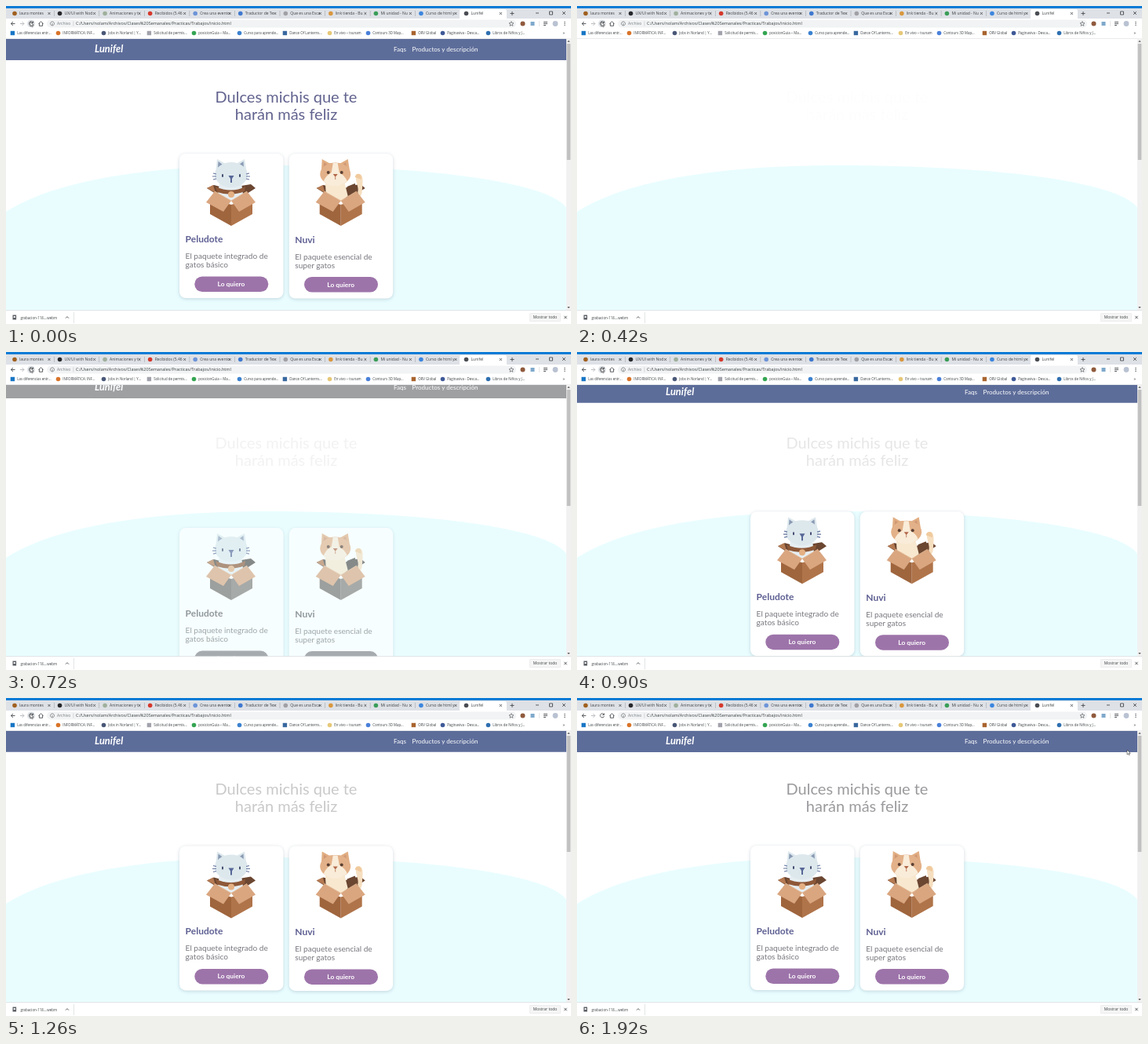
Write an HTML page that moves like this. It is 720 px wide and 405 px high and loops after 1.95 s.

```html
<!DOCTYPE html>
<html lang="es">
<head>
<meta charset="utf-8">
<style>
html, body { margin: 0; width: 100%; height: 100%; overflow: hidden; background: #fff; }
svg { display: block; width: 720px; height: 405px; }
text { font-family: Lato, sans-serif; }
.ui text { font: 5px "Open Sans", sans-serif; fill: #3c4043; }
.ui .mark { font-size: 4.4px; }
.ui .url { font-size: 5.5px; }
.line { fill: none; stroke: #4a4d51; stroke-width: .9; }
.card { filter: drop-shadow(0 1.5px 2px #2a456038); }
.dim .tint { filter: saturate(.1); }
</style>
</head>
<body>
<svg id="stage" viewBox="0 0 720 405">
  <defs>
    <g id="boxBack">
      <path d="M-31 232L-22 228L0 234L13 229L25 227L31 232L20 239L0 248L-20 239Z" fill="#6b4631" class="tint"/>
      <path d="M-31 232L-23 228L-20 238Z" fill="#b57a52"/>
    </g>
    <g id="boxFront">
      <g class="tint">
        <path d="M-27 245L0 253V280L-27 265Z" fill="#9f653d"/>
        <path d="M27 245L0 253V280L27 265Z" fill="#b0744a"/>
      </g>
      <path d="M-21 236L0 248L-10 262L-32 250Z" fill="#d9a680"/>
      <path d="M20 236L31 250L10 262L0 248Z" fill="#d9a680"/>
      <path d="M-21 236L0 248L20 236" fill="none" stroke="#e6bd99" stroke-width=".8"/>
    </g>
    <g id="cat0">
      <path d="M-15 225H13L15 240L0 249L-17 239Z" fill="#e6eef2"/>
      <path d="M-20 214L-18 195L-7 201H6L17 195L20 214Z" fill="#dde8ed"/>
      <path d="M-17 206L-16.5 198L-11 202ZM16 206L15.5 198L10 202Z" fill="#8a9ab4"/>
      <ellipse cy="215" rx="21" ry="16" fill="#dde8ed"/>
      <path d="M-20 230Q0 239 18 230L17 236Q0 243-18 237Z" fill="#8d5838"/>
      <circle cy="240" r="4" fill="#e4b083"/>
      <path d="M-23 213L-19 214M-24 217H-19M-23 221L-19 220M23 213L19 214M24 217H19M23 221L19 220" stroke="#6676a0" stroke-width="1.1"/>
      <path d="M-3.5 216H3.5L1 220V225H-1V220Z" fill="#576797"/>
      <path d="M-11 215V217M11 215V217" stroke="#454f70" stroke-width="2" stroke-linecap="round"/>
    </g>
    <g id="cat1">
      <path d="M18 240C29 236 13 218 22 214C31 213 27 229 27 238Q25 245 18 245Z" fill="#f6dfc0"/>
      <path d="M18 218Q19 213 24 214Q27 216 26 221Z" fill="#f0ca9d"/>
      <path d="M8 230L18 226L22 239L10 244Z" fill="#6b4631" class="tint"/>
      <path d="M-20 222H4L9 242L0 249L-19 239Z" fill="#f8e8cf"/>
      <path d="M-25 214L-24 195L-15 200H0L9 195L12 214Z" fill="#e1ad82"/>
      <path d="M-22 206L-21.5 199L-17 202ZM7 206L6.5 199L2 202Z" fill="#cf9774"/>
      <ellipse cx="-7" cy="214" rx="19.5" ry="14.5" fill="#e3b189"/>
      <path d="M-10 200H-4L-2 212Q6 217 8 223Q0 230-7 229Q-16 230-22 223Q-19 216-12 212Z" fill="#f9ecd9"/>
      <circle cx="-16" cy="212" r="2" fill="#5b4033"/>
      <circle cx="1" cy="212" r="2" fill="#5b4033"/>
      <path d="M-10 214H-4L-7 218Z" fill="#b3694a"/>
      <path d="M-7 218V221" stroke="#b3694a" stroke-width=".8"/>
    </g>
  </defs>

  <path d="M0 262C65 221 185 203 335 203C520 203 690 222 714 257V388H0Z" fill="#e9fdff"/>
  <g id="cards"></g>
  <g id="title" font-size="20" text-anchor="middle">
    <text x="357" y="122.5">Dulces michis que te</text>
    <text x="357" y="144.5">harán más feliz</text>
  </g>
  <g id="header" class="tint" fill="#fff">
    <path d="M0 41H714V69H0Z" fill="#5d6d9a"/>
    <text x="113" y="59" font-size="12.8" font-weight="700" font-style="italic">Lunifel</text>
    <g font-size="8.05">
      <text x="494" y="58">Faqs</text>
      <text x="517.5" y="58">Productos y descripción</text>
    </g>
  </g>
  <g id="ui" class="ui"></g>
  <path id="cursor" d="M0 0V8L1.9 6.4L3.2 9L4.4 8.4L3.2 5.9H5.6Z" fill="#fff" stroke="#222" stroke-width=".7"/>
</svg>
<script>
const $ = id => document.getElementById(id);
const rect = (x, y, w, h, fill, r = 0) =>
  `<rect x="${x}" y="${y}" width="${w}" height="${h}" rx="${r}" fill="${fill}"/>`;
const dot = (x, y, r, fill) => `<circle cx="${x}" cy="${y}" r="${r}" fill="${fill}"/>`;
const label = (x, y, s, extra = '') => `<text x="${x}" y="${y}" ${extra}>${s}</text>`;
const line = (d, extra = '') => `<path class="line" d="${d}" ${extra}/>`;
const cross = (x, y, r) => line(`M${x - r} ${y - r}l${2 * r} ${2 * r}m0 ${-2 * r}l${-2 * r} ${2 * r}`);

function card(i, name, line1, line2) {
  const x = 221 + i * 139.7, y = i * .5;
  return `<g class="card">${rect(x, 188, 132.5, 184 + y, '#fff', 8)}</g>
    <g transform="translate(${x + 66} 0)">
      <use href="#boxBack"/><use href="#cat${i}"/><use href="#boxFront"/>
    </g>
    <g class="tint" transform="translate(${x} ${y})">
      ${label(7.6, 301, name, 'font-size="12" font-weight="700" fill="#5d5f92"')}
      <g font-size="10.1" fill="#77777f">${label(7.6, 322, line1)}${label(7.6, 333, line2)}</g>
      ${rect(19.3, 344.5, 94, 19.5, '#9d74aa', 9.75)}
      ${label(66, 357, 'Lo quiero', 'font-size="8.4" font-weight="700" fill="#fff" text-anchor="middle"')}
    </g>`;
}
$('cards').innerHTML =
  card(0, 'Peludote', 'El paquete integrado de', 'gatos básico') +
  card(1, 'Nuvi', 'El paquete esencial de', 'super gatos');

const tabs = [
  ['laura montes', '#a0601f'], ['UX/UI with Nod', '#26282b'], ['Animaciones y t', '#9fb09c'],
  ['Recibidos (5.46', '#d5392c'], ['Crea una evento', '#6d94d8'], ['Traductor de Te', '#3f78d0'],
  ['Que es una Esca', '#a0a0a5'], ['link tienda - Bu', '#d9973e'], ['Mi unidad - Nu', '#3a9d58'],
  ['Curso de html y', '#3c86df'], ['Lunifel', '#4a4d52']
];
const marks = [
  [8, '#1976c5', 'Las diferencias entr...'], [66, '#d9742a', 'INFORMÁTICA: INF...'],
  [124, '#4a5878', 'Jobs in Norland | Y...'], [182, '#a2a2ac', 'Solicitud de permis...'],
  [239, '#35a553', 'posicionGuia – Ma...'], [297, '#3c82cf', 'Curso para aprende...'],
  [355, '#39689f', 'Dance Of Lanterns...'], [412, '#e6c878', 'En vivo – tsunam'],
  [461, '#4a80d9', 'Contours 3D Map...'], [519, '#a8642f', 'ORV Global'],
  [556, '#3f5a98', 'Paginaviva - Desca...'], [614, '#2f6fb0', 'Libros de Niños y J...']
];

function browser() {
  let s = rect(0, 0, 720, 42, '#fff') + rect(0, 0, 720, 16, '#dee1e6') + rect(0, 0, 720, 3, '#0b7cd6') +
    rect(578, 4, 60, 14, '#fff', 2.5);
  tabs.forEach(([name, color], i) => {
    const x = 11 + i * 57.55;
    s += dot(x, 9.5, 2.8, color) + label(x + 6, 11.2, name) + cross(x + 44, 9.5, 1.4);
    if (i < 9) s += rect(x + 50, 6, .5, 7, '#9a9da2');
  });
  s += line('M642.5 9.5H647.5M645 7V12M675 9H679M692.5 7H696.5V11H692.5Z') + cross(711, 9, 1.9);

  // toolbar
  s += rect(52, 17.5, 598, 10, '#f1f3f4', 5) +
    `<g id="hover">${dot(32, 22.5, 5, '#dfe2e6')}</g>` +
    line('M11.5 22.5H6.5M9 20L6.5 22.5L9 25') +
    line('M18 22.5H23M20.5 20L23 22.5L20.5 25', 'style="stroke:#b5b8bc"') +
    line('M34.4 21A2.6 2.6 0 1 0 34.6 23.2M34.6 19.5V21.5H32.5') +
    line('M41.5 22.5L44.5 19.8L47.5 22.5M42.4 22V25.3H46.6V22') +
    line('M59 19.9a2.5 2.5 0 1 0 .01 0M59 22V24', 'style="stroke-width:.6"') +
    label(65, 24.3, 'Archivo', 'style="fill:#777b80"') + rect(85.7, 19.5, .5, 6, '#bbb') +
    label(89, 24.4, 'C:/Users/nolam/Archivos/Clases%20Semanales/Practicas/Trabajos/inicio.html', 'class="url"') +
    line('M644 19.6L644.8 21.6L647 21.8L645.3 23.2L645.9 25.3L644 24.1L642.1 25.3L642.7 23.2L641 21.8L643.2 21.6Z', 'style="stroke-width:.6"') +
    dot(658.5, 22.5, 3, '#8f5a3c') + rect(668.5, 20, 5, 5, '#7fa9cc') + rect(679, 19, .5, 7, '#ccc') +
    line('M685 20.5H690M685 22.5H690M685 24.5H688') + dot(700, 22.5, 3.4, '#b9c2d2');
  for (const y of [20.4, 22.5, 24.6]) s += dot(712, y, .7, '#4a4d51');

  marks.forEach(([x, color, name], i) => {
    s += (i % 3 ? dot(x + .5, 34.5, 2.8, color) : rect(x - 2.3, 31.8, 5.4, 5.4, color)) +
      label(x + 6.2, 36.1, name, 'class="mark"');
  });
  s += label(709.5, 36, '»') + rect(0, 41, 720, .5, '#d5d7da');

  // scrollbar
  s += rect(714, 41, 6, 347, '#f1f1f1') + rect(714.7, 48, 4.6, 148, '#c1c1c1') +
    '<path d="M715.3 45.7H718.7L717 43.7ZM715.3 383H718.7L717 385Z" fill="#555"/>';

  // downloads
  s += rect(0, 387.5, 720, 18, '#fff') + rect(0, 387.5, 720, .6, '#cfd1d4') +
    rect(8.5, 393.5, 4.6, 6, '#5c6066') + rect(9.7, 395, 2.2, 2, '#fff') +
    label(18.5, 398.6, 'grabacion-118....webm', 'class="mark"') +
    line('M76 397.6L78 395.6L80 397.6') + rect(86, 390, .6, 14, '#d0d2d5') +
    rect(667, 391, 40, 11, '#e6e7e9', 1.5) + rect(667.5, 391.5, 39, 10, '#f5f5f5', 1) +
    label(687, 398.2, 'Mostrar todo', 'text-anchor="middle"') + cross(713, 396.5, 1.7);
  return s;
}
$('ui').innerHTML = browser();

const LOOP = 1950, RELOAD = 350;
const clamp = v => Math.min(1, Math.max(0, v));

// cubic-bezier(.25, .1, .25, 1)
function ease(x) {
  if (x <= 0 || x >= 1) return clamp(x);
  let lo = 0, hi = 1, s;
  for (let i = 0; i < 24; i++) {
    s = (lo + hi) / 2;
    const bx = .75 * s * (1 - s) + s ** 3;
    if (bx < x) lo = s; else hi = s;
  }
  return .3 * s * (1 - s) ** 2 + 3 * s * s * (1 - s) + s ** 3;
}

function place(id, y, alpha) {
  $(id).setAttribute('transform', `translate(0 ${y})`);
  $(id).setAttribute('opacity', alpha);
}

function draw(t) {
  const old = t < RELOAD;
  const p = old ? 1 : ease((t - RELOAD) / 1000);
  const alpha = old ? 1 : clamp((t - RELOAD - 100) / 420);
  place('header', -28 * (1 - p), alpha);
  place('cards', 100 * (1 - p), alpha);
  $('stage').classList.toggle('dim', alpha < .8);
  $('title').setAttribute('fill', old ? '#62638f' : '#69696e');
  $('title').setAttribute('opacity', old ? 1 : ease((t - RELOAD) / 4000));

  const m = clamp((t - 1560) / 350), u = m * m * (3 - 2 * m);
  $('cursor').setAttribute('transform', `translate(${31 + 670 * u} ${20 + 46 * u}) scale(.75)`);
  $('hover').setAttribute('opacity', m > .1 ? 0 : 1);
}

const start = performance.now();
function frame() {
  draw((performance.now() - start) % LOOP);
  requestAnimationFrame(frame);
}
frame();
</script>
</body>
</html>
```
